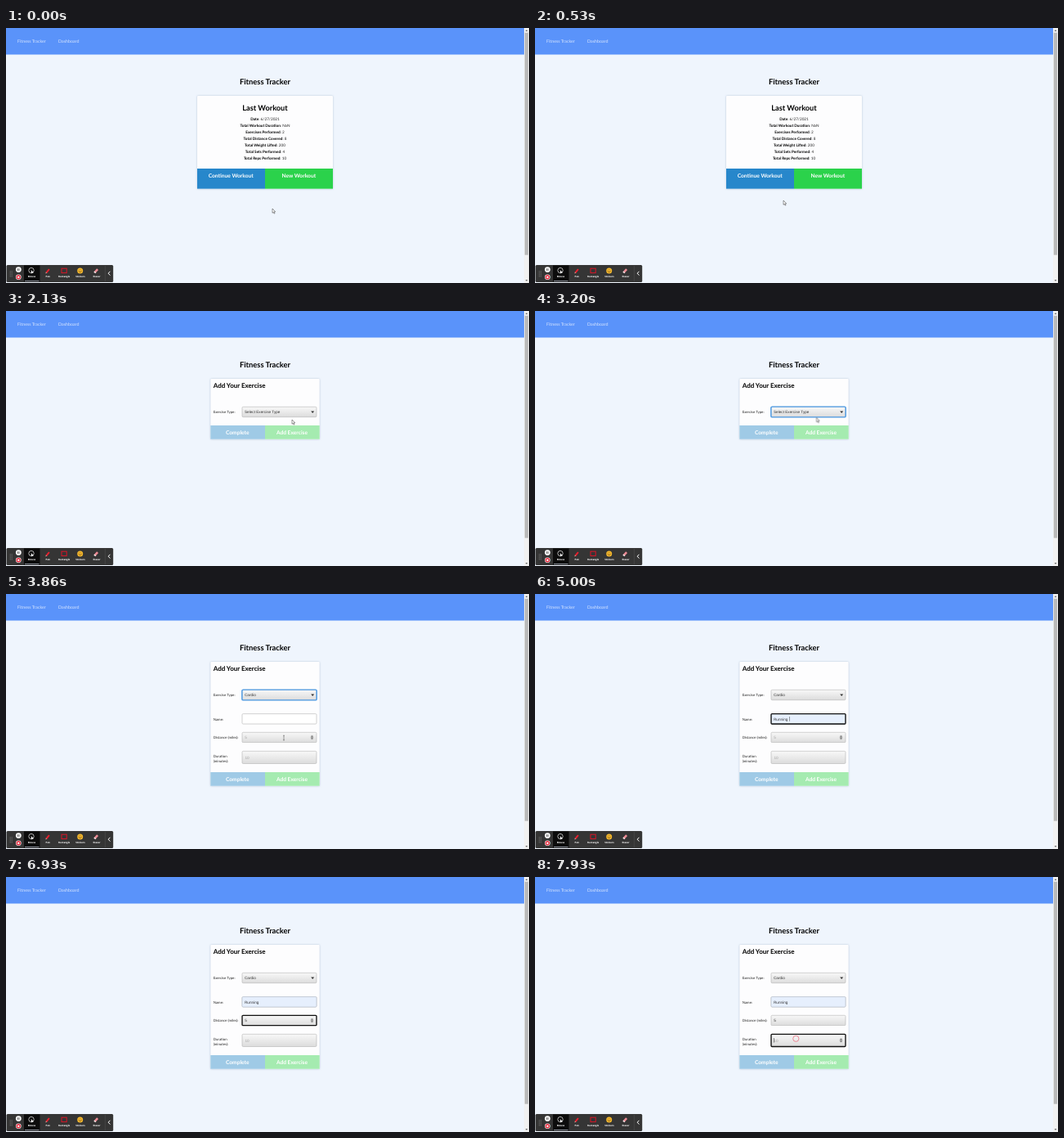
These frames come from a looping animation (640 px wide and 312 px high, 8 s). An HTML page:

```html
<!DOCTYPE html>
<html lang="en">
<head>
<meta charset="utf-8">
<title>Fitness Tracker</title>
<style>
html, body { margin: 0; width: 100%; height: 100%; overflow: hidden; background: #eff5fd; }
svg { display: block; width: 640px; height: 312px; }
text { font-family: Lato, sans-serif; text-rendering: geometricPrecision; }
.mid { text-anchor: middle; }
.bold { font-weight: 700; }
.nav { font-size: 5.33px; fill: #d9e6fe; }
.btn { font-size: 6.67px; font-weight: 700; fill: #fff; text-anchor: middle; }
.stat { font-size: 4.67px; text-anchor: middle; fill: #222; }
.stat tspan { font-weight: 700; fill: #000; }
.label { font-size: 4.33px; fill: #222; }
.value { font: 4.67px "Liberation Sans", Arial, sans-serif; fill: #333; }
.hint { fill: #a5a5a5; }
.tool { font: 700 2.9px "Open Sans", sans-serif; fill: #fff; text-anchor: middle; }
.field { fill: url(#grey); stroke: #b4b4b4; stroke-width: .6; }
.focus { fill: none; stroke: #111; stroke-width: 1.3; }
.caret { stroke: #111; stroke-width: .5; }
.card { fill: #fdfdfe; filter: drop-shadow(0 .5px 1px #8fa4bd99); }
.ring { fill: none; stroke: #ee6f80; stroke-width: .8; transform-box: fill-box; transform-origin: center; }

.on { animation: 8s step-end infinite; }
.home { animation-name: home; }
.form { animation-name: form; }
.cardio { animation-name: cardio; }
.unset { animation-name: unset-type; }
.sel-focus { animation-name: sel-focus; }
.name-focus { animation-name: name-focus; }
.dist-focus { animation-name: dist-focus; }
.dur-focus { animation-name: dur-focus; }
.type1 { animation-name: type1; }
.type2 { animation-name: type2; }
.filled { animation-name: filled; }
.dist-spin { animation-name: dist-spin; }
.dur-spin { animation-name: dur-spin; }
.dist-hint { animation-name: dist-hint; }
.dist-value { animation-name: dist-value; }
.name-caret { animation-name: name-caret; }
.dist-caret { animation-name: dist-caret; }
.arrow { animation-name: arrow; }
.hand { animation-name: hand; }
.beam { animation-name: beam; }
.grow { animation-name: grow; }
.drop { animation-name: drop; }
.hover { animation: hover 8s linear infinite; }
.mouse { animation: move 8s ease-in-out infinite; }
.ring1 { animation: ring1 8s linear infinite; }
.ring2 { animation: ring2 8s linear infinite; }
.ring3 { animation: ring3 8s linear infinite; }

/* 1% = 80 ms */
@keyframes home { 0% { opacity: 1 } 23.25%, 100% { opacity: 0 } }
@keyframes form { 0% { opacity: 0 } 23.25%, 100% { opacity: 1 } }
@keyframes cardio { 0% { opacity: 0 } 42.5%, 100% { opacity: 1 } }
@keyframes unset-type { 0% { opacity: 1 } 42.5%, 100% { opacity: 0 } }
@keyframes grow { 0% { height: 74px } 42.5%, 100% { height: 152px } }
@keyframes drop { 0% { transform: none } 42.5%, 100% { transform: translateY(78px) } }
@keyframes sel-focus { 0% { opacity: 0 } 34.1% { opacity: 1 } 51.6%, 100% { opacity: 0 } }
@keyframes name-focus { 0% { opacity: 0 } 51.6% { opacity: 1 } 67.5%, 100% { opacity: 0 } }
@keyframes dist-focus { 0% { opacity: 0 } 67.5% { opacity: 1 } 97.5%, 100% { opacity: 0 } }
@keyframes dur-focus { 0% { opacity: 0 } 97.5%, 100% { opacity: 1 } }
@keyframes type1 { 0% { opacity: 0 } 57.5% { opacity: 1 } 58.2%, 100% { opacity: 0 } }
@keyframes type2 { 0% { opacity: 0 } 58.2% { opacity: 1 } 62.4%, 100% { opacity: 0 } }
@keyframes filled { 0% { opacity: 0 } 62.4%, 100% { opacity: 1 } }
@keyframes dist-spin { 0% { opacity: 0 } 48.2% { opacity: 1 } 93.7%, 100% { opacity: 0 } }
@keyframes dur-spin { 0% { opacity: 0 } 93.7%, 100% { opacity: 1 } }
@keyframes dist-hint { 0% { opacity: 1 } 86.6%, 100% { opacity: 0 } }
@keyframes dist-value { 0% { opacity: 0 } 86.6%, 100% { opacity: 1 } }
@keyframes name-caret { 0% { opacity: 0 } 62.4% { opacity: 1 } 65%, 100% { opacity: 0 } }
@keyframes dist-caret { 0% { opacity: 0 } 67.5% { opacity: 1 } 74.1% { opacity: 0 } 79.1% { opacity: 1 } 86.6%, 100% { opacity: 0 } }
@keyframes hover { 0%, 12.9% { fill: #2787cb } 14.1%, 100% { fill: #1575b7 } }
@keyframes arrow { 0% { opacity: 1 } 12.9% { opacity: 0 } 23.25% { opacity: 1 } 45% { opacity: 0 } 100% { opacity: 0 } }
@keyframes hand { 0% { opacity: 0 } 12.9% { opacity: 1 } 23.25%, 100% { opacity: 0 } }
@keyframes beam { 0% { opacity: 0 } 45% { opacity: 1 } 51.6% { opacity: 0 } 89.1% { opacity: 1 } 97.5%, 100% { opacity: 0 } }
@keyframes move {
  0%, .75% { transform: translate(326px, 221px) }
  6.6%, 10.75% { transform: translate(304px, 211px) }
  15%, 22% { transform: translate(266px, 191px) }
  26.6% { transform: translate(350px, 133px) }
  31.6%, 39.1% { transform: translate(344px, 125px) }
  40%, 41.5% { transform: translate(344.5px, 130.5px) }
  45.75%, 89.1% { transform: translate(340px, 176px) }
  95.75%, 100% { transform: translate(319px, 198px) }
}
@keyframes ring1 { 0%, 21.5% { opacity: 0; transform: scale(.3) } 21.6% { opacity: 1; transform: scale(.4) } 23.2% { opacity: 1; transform: none } 24.1%, 100% { opacity: 0; transform: none } }
@keyframes ring2 { 0%, 32.4% { opacity: 0; transform: scale(.3) } 32.5% { opacity: 1; transform: scale(.4) } 34.1% { opacity: 1; transform: none } 35%, 100% { opacity: 0; transform: none } }
@keyframes ring3 { 0%, 97.4% { opacity: 0; transform: scale(.3) } 97.5% { opacity: 1; transform: scale(.4) } 99%, 100% { opacity: 1; transform: none } }
</style>
</head>
<body>
<svg viewBox="0 0 640 312">
  <defs>
    <linearGradient id="grey" x2="0" y2="1">
      <stop stop-color="#f8f8f8"/>
      <stop offset="1" stop-color="#dcdcdc"/>
    </linearGradient>
    <path id="spin" d="M-1.6-.6 0-2.6 1.6-.6ZM-1.6.6 0 2.6 1.6.6Z" fill="#444"/>
  </defs>

  <rect width="640" height="312" fill="#eff5fd"/>
  <rect width="634" height="32.5" fill="#5a93fa"/>
  <text class="nav" x="14" y="18.2">Fitness Tracker</text>
  <text class="nav" x="64" y="18.2">Dashboard</text>
  <text class="mid bold" x="317" y="68.8" font-size="9.33">Fitness Tracker</text>

  <g class="on home">
    <rect class="card" x="234" y="83" width="166" height="114" rx="1"/>
    <text class="mid bold" x="317" y="100.6" font-size="9.2">Last Workout</text>
    <text class="stat" x="317" y="112.7"><tspan>Date</tspan>: 6/27/2021</text>
    <text class="stat" x="317" y="120.7"><tspan>Total Workout Duration</tspan>: NaN</text>
    <text class="stat" x="317" y="128.7"><tspan>Exercises Performed</tspan>: 2</text>
    <text class="stat" x="317" y="136.7"><tspan>Total Distance Covered</tspan>: 8</text>
    <text class="stat" x="317" y="144.7"><tspan>Total Weight Lifted</tspan>: 200</text>
    <text class="stat" x="317" y="152.7"><tspan>Total Sets Performed</tspan>: 4</text>
    <text class="stat" x="317" y="160.7"><tspan>Total Reps Performed</tspan>: 10</text>
    <rect class="hover" x="234" y="172" width="83" height="24.7"/>
    <rect x="317" y="172" width="83" height="24.7" fill="#2bd24b"/>
    <text class="btn" x="275.2" y="183.2">Continue Workout</text>
    <text class="btn" x="358.3" y="183.2">New Workout</text>
  </g>

  <g class="on form">
    <rect class="card on grow" x="250.3" y="83" width="133.4" height="74" rx="1"/>
    <text class="bold" x="253.7" y="94" font-size="8">Add Your Exercise</text>

    <text class="label" x="253.7" y="125.4">Exercise Type:</text>
    <rect class="field" x="289" y="117.3" width="91" height="12.4" rx="1.2"/>
    <rect class="on sel-focus" x="288.8" y="117.1" width="91.4" height="12.8" rx="1.5" fill="none" stroke="#4c9be6" stroke-width="1.4"/>
    <path d="M373.2 122.6h4l-2 2.4z" fill="#333"/>
    <text class="value on unset" x="292" y="125.2">Select Exercise Type</text>

    <g class="on cardio">
      <text class="value" x="292" y="125.2">Cardio</text>

      <text class="label" x="253.7" y="154.6">Name:</text>
      <rect x="289" y="146.6" width="91" height="12.4" rx="1.2" fill="#fff" stroke="#b4b4b4" stroke-width=".6"/>
      <rect class="on filled" x="289" y="146.6" width="91" height="12.4" rx="1.2" fill="#e6effd" stroke="#b4bcc9" stroke-width=".6"/>
      <rect class="focus on name-focus" x="289" y="146.6" width="91" height="12.4" rx="1"/>
      <text class="value on type1" x="292" y="154.5">R</text>
      <text class="value on type2" x="292" y="154.5">Ru</text>
      <text class="value on filled" x="292" y="154.5">Running</text>
      <path class="caret on name-caret" d="M311.3 150v5.6"/>

      <text class="label" x="253.7" y="177.2">Distance (miles):</text>
      <rect class="field" x="289" y="169.3" width="91" height="12.4" rx="1.2"/>
      <rect class="focus on dist-focus" x="289" y="169.3" width="91" height="12.4" rx="1"/>
      <text class="value hint on dist-hint" x="292.2" y="177.2">5</text>
      <text class="value on dist-value" x="292.2" y="177.2">5</text>
      <path class="caret on dist-caret" d="M292 172.7v5.6"/>
      <use class="on dist-spin" href="#spin" x="374.5" y="175.5"/>

      <text class="label" x="253.7" y="200.4">Duration</text>
      <text class="label" x="253.7" y="206.2">(minutes):</text>
      <rect class="field" x="289" y="192.3" width="91" height="15.2" rx="1.2"/>
      <text class="value hint" x="292.4" y="201.6">10</text>
      <g class="on dur-focus">
        <rect class="focus" x="289" y="192.3" width="91" height="15.2" rx="1"/>
        <path class="caret" d="M292.4 197v5.6"/>
      </g>
      <use class="on dur-spin" href="#spin" x="374.5" y="199.8"/>
    </g>

    <g class="on drop">
      <rect x="250.3" y="140" width="66.7" height="16.8" fill="#9fcae6"/>
      <rect x="317" y="140" width="66.7" height="16.8" fill="#a5ebb0"/>
      <text class="btn" x="283.3" y="151">Complete</text>
      <text class="btn" x="350" y="151">Add Exercise</text>
    </g>
  </g>

  <!-- scrollbar -->
  <rect x="634" width="6" height="312" fill="#f1f1f1"/>
  <rect x="634.8" y="5.7" width="4.2" height="272" fill="#b9b9b9"/>
  <path d="M635.6 3.8 637 2.2l1.4 1.6ZM635.6 308.2l1.4 1.6 1.4-1.6Z" fill="#444"/>

  <!-- recorder toolbar -->
  <g>
    <rect x=".5" y="290" width="130.7" height="21" rx="1.5" fill="#353535"/>
    <rect x="22" y="290.4" width="19.5" height="20.2" fill="#0c0c0c"/>
    <path d="M23 309.6h17.5" stroke="#cfd6e6" stroke-width=".7"/>
    <path d="M5.2 297.5v7M7.2 297.5v7" stroke="#aaa" stroke-width=".8" stroke-dasharray=".8 1.2"/>
    <circle cx="15.3" cy="295.6" r="3.4" fill="#fff"/>
    <path d="M14.5 294.2v2.8M16.1 294.2v2.8" stroke="#333" stroke-width=".7"/>
    <circle cx="15.3" cy="304.8" r="3.3" fill="#fff"/>
    <circle cx="15.3" cy="304.8" r="2.7" fill="#e3273a"/>
    <rect x="14.2" y="303.7" width="2.2" height="2.2" fill="#fff"/>
    <circle cx="31" cy="296.6" r="3.2" fill="none" stroke="#d8d8d8" stroke-width=".8"/>
    <path d="M30.8 296l.2 4.4 1.1-1 1.6.1Z" fill="#fff"/>
    <path d="M49.4 299.3l3.5-4.2" stroke="#e8202f" stroke-width="2"/>
    <path d="M48.5 300.4l.3-1.8 1.3 1.1Z" fill="#f5b0a8"/>
    <rect x="68" y="294.2" width="6.2" height="5.4" fill="none" stroke="#d91527" stroke-width="1"/>
    <circle cx="90.7" cy="296.9" r="3.5" fill="#f5b92e"/>
    <path d="M88.8 297.4q1.9 2.6 3.8 0M89.3 295.8h.8M91.3 295.8h.8" fill="none" stroke="#603a10" stroke-width=".7"/>
    <path d="M108.7 299l3.4-3.9" stroke="#ee8b95" stroke-width="2.6"/>
    <path d="M108.3 299.5l1-1.2" stroke="#f3e4e4" stroke-width="2.6"/>
    <text class="tool" x="31.5" y="305">Mouse</text>
    <text class="tool" x="51.3" y="305">Pen</text>
    <text class="tool" x="71.2" y="305">Rectangle</text>
    <text class="tool" x="91" y="305">Stickers</text>
    <text class="tool" x="111" y="305">Eraser</text>
    <path d="M121.3 291v19" stroke="#555" stroke-width=".5"/>
    <path d="M127.4 297.8l-2.2 2.4 2.2 2.4" fill="none" stroke="#fff" stroke-width="1"/>
  </g>

  <circle class="ring ring1" cx="266" cy="192" r="3.6"/>
  <circle class="ring ring2" cx="344" cy="125" r="3.6"/>
  <circle class="ring ring3" cx="319.3" cy="197.8" r="3.6"/>

  <g class="mouse">
    <path class="on arrow" d="M0 0v5.3l1.2-1.1.9 1.9.9-.4-.9-1.9h1.6Z" fill="#fff" stroke="#333" stroke-width=".5"/>
    <path class="on hand" d="M0 .5q.6-.8 1.1 0v2l2.4.6q.6.3.4 1.1l-.5 2.2H.6L-1.3 4q.3-.9 1.3-.2Z" fill="#fff" stroke="#333" stroke-width=".4"/>
    <path class="on beam" d="M-1-2.8h2M0-2.8v5.6M-1 2.8h2" fill="none" stroke="#444" stroke-width=".5"/>
  </g>
</svg>
</body>
</html>
```
